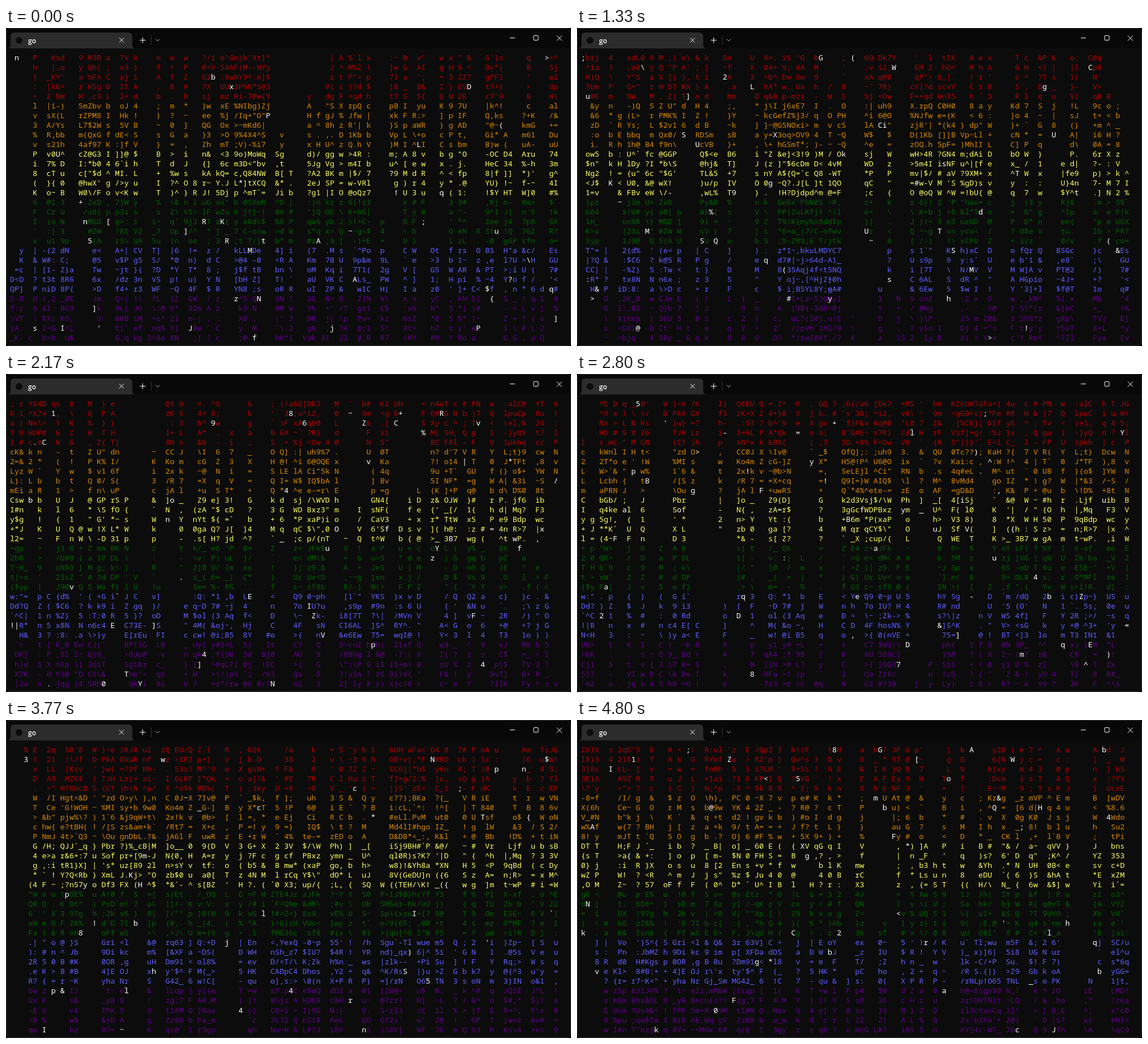
Write an HTML page with a canvas that moves like this. It is 998x561 px and loops after 4830 ms.

```html
<!DOCTYPE html>
<html lang="en">
<head>
<meta charset="utf-8">
<title>go</title>
<style>
  html, body { margin: 0; width: 998px; height: 561px; overflow: hidden; background: #000; }
  canvas, svg { position: absolute; left: 0; top: 0; }
  text { font: 600 12px "Open Sans", "Noto Sans", sans-serif; fill: #fff; }
</style>
</head>
<body>
<canvas id="rain" width="998" height="561"></canvas>
<svg width="998" height="561" fill="none" stroke="#fff">
  <path d="M1 36V8Q1 1 8 1H990Q997 1 997 8V36Z" fill="#080808" stroke="none"/>
  <path d="M2 36Q8 36 8 30V15Q8 8 15 8H216Q223 8 223 15V30Q223 36 229 36Z" fill="#2c2c2c" stroke="none"/>
  <circle cx="23" cy="22" r="6" fill="#0c0c0c" stroke="none"/>
  <text x="39" y="26.5" stroke="none">go</text>
  <path d="M200 17.5l8 8m0-8l-8 8M236.500 21.500h10m-5-5v10"/>
  <path d="M256.500 13v17" stroke="#333"/>
  <path d="M264.500 19.500l3.500 3.500 3.500-3.500" stroke="#aaa"/>
  <path d="M890 17.500h9M973 13.500l9 9m0-9l-9 9"/>
  <rect x="932" y="13.500" width="8" height="8" rx="1"/>
  <rect x="0.500" y="0.500" width="997" height="560" rx="8" stroke="#303030"/>
</svg>
<script>
const COLS = 120, ROWS = 30, CELL_W = 8.07, CELL_H = 17.03;
const LOOP = 4830, STEP = 1000 / 30;
const BANDS = ['#af0000', '#d78700', '#ffff5f', '#005f00', '#5f5fff', '#5f0087'];
const ctx = document.getElementById('rain').getContext('2d');

let seed = 2024;
function random() {
  seed = (seed + 0x6d2b79f5) | 0;
  let h = Math.imul(seed ^ (seed >>> 15), 1 | seed);
  h = (h + Math.imul(h ^ (h >>> 7), 61 | h)) ^ h;
  return ((h ^ (h >>> 14)) >>> 0) / 4294967296;
}
const between = (low, high) => low + random() * (high - low);
const glyph = () => String.fromCharCode(33 + Math.floor(random() * 94));

// Each column is a series of streams: a head falls, then the tail wipes it.
function makeColumn() {
  const streams = [];
  let start = between(-6500, -3000);
  while (start < LOOP) {
    const life = between(500, 3200);
    streams.push({ start, life, pace: between(32, 68), glyphs: Array.from({ length: ROWS }, glyph) });
    start += life + between(300, 3300);
  }
  return streams;
}
const columns = Array.from({ length: COLS }, makeColumn);

function drawStream({ start, life, pace, glyphs }, x, time) {
  const head = Math.floor((time - start) / pace);
  const tail = Math.floor((time - start - life) / pace);
  for (let row = Math.max(0, tail + 1); row <= Math.min(head, ROWS - 1); row++) {
    ctx.fillStyle = row === head ? '#fff' : BANDS[Math.floor(row / 5)];
    ctx.fillText(glyphs[row], x, 56.7 + row * CELL_H);
  }
}

function frame(now) {
  const time = Math.floor((now % LOOP) / STEP) * STEP;
  ctx.fillStyle = '#0c0c0c';
  ctx.beginPath();
  ctx.roundRect(0.5, 0.5, 997, 560, 8);
  ctx.fill();
  ctx.font = '500 13.45px "Noto Sans Mono", "DejaVu Sans Mono", monospace';
  columns.forEach((streams, col) =>
    streams.forEach(stream => drawStream(stream, 7 + col * CELL_W, time)));
  requestAnimationFrame(frame);
}
requestAnimationFrame(frame);
</script>
</body>
</html>
```
